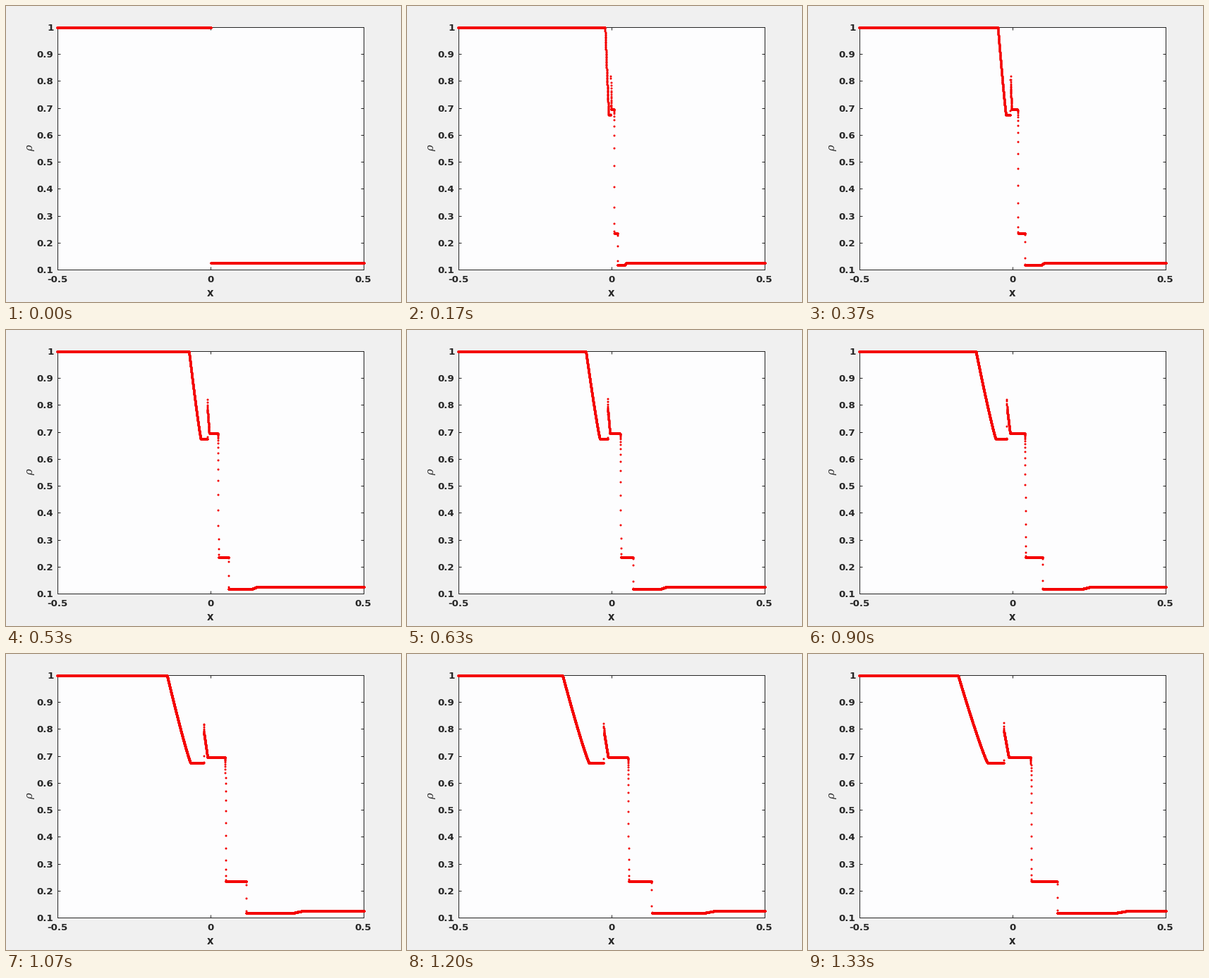
Write a matplotlib script that moves like this. It is 560 px wide and 420 px high and loops after 1.36 s.

```python
import numpy as np
import matplotlib.pyplot as plt
from matplotlib.animation import FuncAnimation
from matplotlib.path import Path

# Density profile of a magnetised shock tube, built from its wave speeds.

W, H, DPI = 560, 420, 100
PX = 72 / DPI                       # points per pixel
LEFT, RIGHT, TOP, BOTTOM = 73, 507, 30, 374
PAPER, PANEL, INK, RED = "#f0f0f0", "#fdfdfe", "#262626", "#f40000"

CELLS = 8000
DT = 0.0025                         # simulated time per step
X = (np.arange(CELLS) + 0.5) / CELLS - 0.5

# Wave speeds, left to right
HEAD, TAIL = -1.792, -0.834
JUMP, JUMP_END = -0.298, -0.14
CONTACT, SHOCK = 0.599, 1.444
FAST_TAIL, FAST_HEAD = 3.31, 3.684


def sigmoid(z):
    return 1 / (1 + np.exp(-np.clip(z, -50, 50)))


def cells_from(speed, t, shift=0.0):
    """Signed distance to a wave, in cells."""
    return (X - speed * t) * CELLS - shift


def density(step):
    if step == 0:
        return np.where(X < 0, 1.0, 0.125)
    t = step * DT
    xi = X / t

    # fast rarefaction on the left
    s = np.clip((xi - TAIL) / (HEAD - TAIL), 0, 1)
    rho = 0.676 + 0.324 * s ** 1.12

    # compound wave: jump, small overshoot, ramp down
    m = cells_from(JUMP, t)
    ramp = np.interp(xi, [JUMP, JUMP_END], [0.795, 0.6975])
    peak = ramp + 0.05 * np.exp(-np.maximum(m, 0) / 2)
    rho += (peak - 0.676) * sigmoid(3.5 * (m + 0.3))

    # contact, smeared more and more with time
    rate = 0.268 * (40 / step) ** 0.27
    m = np.clip(rate * cells_from(CONTACT, t, -0.12), -30, 6)
    rho += (0.235 - 0.6975) * (1 - 0.5 ** np.exp(m))

    # slow shock, then fast rarefaction on the right
    rho += (0.1175 - 0.235) * sigmoid(2.3 * cells_from(SHOCK, t, 0.3))
    rho += np.interp(xi, [FAST_TAIL, FAST_HEAD], [0, 0.0075])
    return rho


fig = plt.figure(figsize=(W / DPI, H / DPI), dpi=DPI, facecolor=PAPER)
ax = fig.add_axes([LEFT / W, 1 - BOTTOM / H, (RIGHT - LEFT) / W, (BOTTOM - TOP) / H],
                  facecolor=PANEL)
ax.set(xlim=(-0.5, 0.5), ylim=(0.1, 1), xticks=[-0.5, 0, 0.5],
       yticks=np.arange(1, 11) / 10)
ax.tick_params(direction="in", top=True, right=True, length=4.3 * PX, width=PX,
               color=INK, labelbottom=False, labelleft=False)
for spine in ax.spines.values():
    spine.set(linewidth=PX, edgecolor=INK)


def label(x, y, text, size=13.33, ha="center", **style):
    style = {"family": "DejaVu Sans", "weight": "bold"} | style
    fig.text(x / W, 1 - y / H, text, size=size * PX, ha=ha, va="baseline",
             color=INK, **style)


for i in range(1, 11):
    y = BOTTOM - (BOTTOM - TOP) * (i - 1) / 9
    label(67.5, y + 5, f"{i / 10:g}", ha="right")
for x in (-0.5, 0, 0.5):
    label(289.5 + 434 * x, 391.5, f"{x:g}")
label(289.5, 412, "x", 14.67)
label(38, 202, "ρ", 14.67, family="DejaVu Serif", weight="normal", style="italic",
      rotation=90, rotation_mode="anchor")

# Three-pixel dot centred on a pixel; its reach of two pixels sets the marker size
dot = Path.circle((0.5, -0.5), 1.5)
dots, = ax.plot([], [], ls="", marker=dot, ms=4 * PX, mew=0, color=RED,
                clip_on=False, zorder=5)
bar, = ax.plot([], [], color=RED, lw=4 * PX, solid_capstyle="round",
               clip_on=False, zorder=5, snap=False)
BAR_Y = 1 - 0.9 / (BOTTOM - TOP)    # one pixel below the top edge


def draw(tick):
    step = (6 * tick + 3) // 20     # 30 steps a second on a 10 ms clock
    dots.set_data(X, density(step))
    bar.set_data([-0.5, HEAD * step * DT], [BAR_Y, BAR_Y])
    return dots, bar


anim = FuncAnimation(fig, draw, frames=136, interval=10, repeat=True,
                     repeat_delay=0, blit=False)
plt.show()
```
